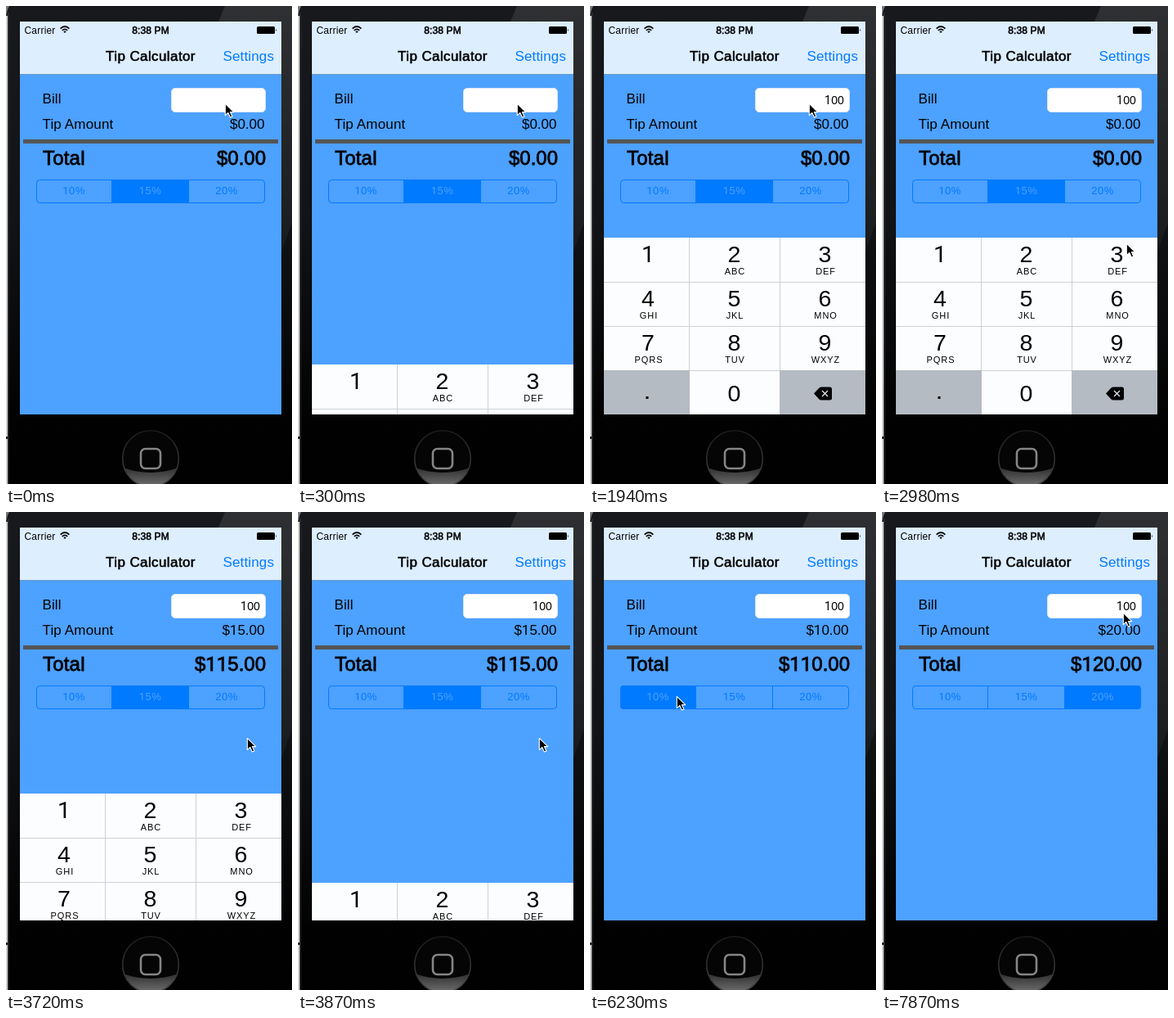
An HTML page for the animation above (8 s loop, 350 by 584 pixels).

```html
<!DOCTYPE html>
<html lang="en">
<head>
<meta charset="utf-8">
<title>Tip Calculator</title>
<style>
html, body { margin: 0; width: 100%; height: 100%; overflow: hidden; background: #000; }
svg { display: block; width: 350px; height: 584px; }
text { font-family: "Liberation Sans", Arial, sans-serif; white-space: pre; }
.one { font-family: Roboto, sans-serif; }
.medium { stroke: #000; stroke-width: .55px; }
.heavy { stroke: #000; stroke-width: .8px; }
</style>
</head>
<body>
<svg viewBox="0 0 350 584" xmlns="http://www.w3.org/2000/svg">
  <defs>
    <linearGradient id="body" x2="0" y2="1">
      <stop offset="0" stop-color="#18191c"/>
      <stop offset=".45" stop-color="#121316"/>
      <stop offset=".86" stop-color="#020202"/>
      <stop offset="1" stop-color="#000"/>
    </linearGradient>
    <linearGradient id="gloss" x2="0" y2="1">
      <stop offset="0" stop-color="#fff" stop-opacity=".1"/>
      <stop offset="1" stop-color="#fff" stop-opacity=".04"/>
    </linearGradient>
    <linearGradient id="shine" x2="0" y2="1">
      <stop offset="0" stop-color="#2c2c2c"/>
      <stop offset="1" stop-color="#777"/>
    </linearGradient>
    <linearGradient id="ring" x2="0" y2="1">
      <stop offset="0" stop-color="#1c1c1c"/>
      <stop offset="1" stop-color="#484848"/>
    </linearGradient>
    <clipPath id="screen"><rect x="17" y="19" width="320" height="480"/></clipPath>
    <clipPath id="home"><circle cx="177" cy="553" r="34"/></clipPath>
    <clipPath id="pill"><rect x="37" y="212" width="280" height="29" rx="4"/></clipPath>
  </defs>

  <rect width="350" height="584" fill="url(#body)"/>
  <path d="M268 0H350V265L337 300V19H260Z" fill="url(#gloss)"/>
  <path d="M0 14Q1 5 4 0H0Z" fill="#77797c"/>
  <rect y="12" width="2" height="572" fill="#cfd0d2"/>
  <rect x="2" y="8" width="1.5" height="576" fill="#2d2e31"/>
  <rect y="526" width="2" height="3" fill="#222"/>

  <g clip-path="url(#home)">
    <circle cx="177" cy="553" r="34" fill="#050505"/>
    <path d="M140 563Q177 577 214 563V590H140Z" fill="url(#shine)"/>
  </g>
  <circle cx="177" cy="553" r="34.3" fill="none" stroke="url(#ring)" stroke-width="1.5"/>
  <rect x="165" y="541" width="24" height="24" rx="5.5" fill="none" stroke="#858585" stroke-width="2.6"/>

  <g clip-path="url(#screen)">
    <rect x="17" y="19" width="320" height="480" fill="#4da1ff"/>
    <rect x="17" y="19" width="320" height="64" fill="#ddeeff"/>
    <rect x="17" y="83" width="320" height="1" fill="#6d9ac9"/>
    <path d="M66.6 27.6Q72 22.4 77.4 27.6M68.8 29.8Q72 26.8 75.2 29.8" fill="none" stroke="#000" stroke-width="1.7"/>
    <path d="M70.3 31.2Q72 29.8 73.7 31.2L72 33Z"/>
    <rect x="307" y="25" width="22" height="9" rx="1.5"/>
    <path d="M330 27.7Q331.6 29.5 330 31.3Z"/>
    <rect x="202.5" y="100.5" width="115" height="29" rx="4.5" fill="#fff" stroke="#d8e6f5"/>
    <rect x="21" y="163" width="312" height="5" fill="#555"/>
    <g id="labels"></g>
    <g clip-path="url(#pill)" fill="#007aff">
      <rect id="press" y="212" width="93.5" height="29" opacity=".2"/>
      <rect id="picked" y="212" width="93.5" height="29"/>
    </g>
    <path d="M129.5 212V241M223.5 212V241" stroke="#007aff"/>
    <rect x="37.5" y="212.5" width="279" height="28" rx="4" fill="none" stroke="#007aff"/>
    <g id="rates"></g>
    <rect id="caret" x="309" y="105" width="2" height="18" fill="#4269dc"/>
    <g id="keys">
      <rect x="17" y="283" width="320" height="216" fill="#fcfdff"/>
      <path d="M121.5 283V499M232.5 283V499M17 337.5H337M17 391.5H337M17 445.5H337" stroke="#cdd1d6"/>
      <path d="M17 445H122V499H17ZM232 445H337V499H232Z" fill="#b5bbc2"/>
      <path d="M274 473.5L280 467Q281.2 465.5 283 465.5H293.5Q296 465.5 296 468V479Q296 481.5 293.5 481.5H283Q281.2 481.5 280 480Z"/>
      <path d="M284 470L291 477M291 470L284 477" stroke="#dfe2e6" stroke-width="1.4"/>
      <rect x="68.5" y="477" width="3" height="3"/>
    </g>
  </g>
  <path id="cursor" d="M1.3 1.3V15.6L4.8 12.4L7.4 18L9.9 17L7.4 11.6H11.8Z" stroke="#fff" stroke-width="1.1" stroke-linejoin="round"/>
</svg>
<script>
const LOOP = 8000;
const BEAT = 148.5; // the screen refreshes once per beat; all timing below is in beats
const BLUE = "#007aff";
const $ = id => document.getElementById(id);

// The plain "1" comes from a face without a foot serif.
function write(node, str) {
  if (node.dataset.str === str) return;
  node.dataset.str = str;
  node.innerHTML = str.replace(/1/g, '<tspan class="one">1</tspan>');
}

function label(parent, str, x, y, size, { anchor = "start", fill = "#000", gap = 0, cls = "" } = {}) {
  const node = document.createElementNS("http://www.w3.org/2000/svg", "text");
  const attrs = { x, y, fill, "font-size": size, "text-anchor": anchor, "letter-spacing": gap, class: cls };
  for (const name in attrs) node.setAttribute(name, attrs[name]);
  write(node, str);
  $(parent).append(node);
  return node;
}

const middle = { anchor: "middle" };
const end = { anchor: "end" };
label("labels", "Carrier", 22.5, 33.5, 12, { gap: .2 });
label("labels", "8:38 PM", 177, 33.5, 12, { ...middle, gap: .15, cls: "medium" });
label("labels", "Tip Calculator", 177, 67, 17, { ...middle, gap: .4, cls: "medium" });
label("labels", "Settings", 265.5, 67, 17, { fill: BLUE, gap: .15 });
label("labels", "Bill", 44.5, 119, 17, { gap: .1 });
label("labels", "Tip Amount", 44.5, 150, 17, { gap: .15 });
label("labels", "Total", 45, 194, 24, { gap: .2, cls: "heavy" });
const bill = label("labels", "", 311, 119.5, 14, { ...end, gap: .15 });
const tip = label("labels", "", 316.5, 150, 17, end);
const total = label("labels", "", 318, 194, 24, { ...end, cls: "heavy" });

const percent = i => 10 + 5 * i;
const segmentX = i => 36 + 93.5 * i;
const rates = [0, 1, 2].map(i =>
  label("rates", percent(i) + "%", segmentX(i) + 47, 230.3, 13, { ...middle, gap: .5 }));

const columns = [71, 176.5, 287.5];
[..." ABC DEF GHI JKL MNO PQRS TUV WXYZ".split(" ")].forEach((word, i) => {
  const x = columns[i % 3], y = 313 + 54 * Math.floor(i / 3);
  label("keys", String(i + 1), x, y, 28.5, middle);
  label("keys", word, x + 1, y + 15, 11, { ...middle, gap: .9 });
});
label("keys", "0", columns[1], 482.5, 28.5, middle);

const ramp = (k, start, length) => Math.min(1, Math.max(0, (k - start) / length));
const smooth = u => u * u * (3 - 2 * u);

// The pointer rests at each stop until it leaves for the next one.
const stops = [
  { x: 267, y: 118, leave: 15 },
  { x: 298, y: 289, arrive: 20, leave: 20 },
  { x: 294, y: 275, arrive: 23, leave: 28 },
  { x: 281, y: 248, arrive: 32, leave: 32 },
  { x: 97, y: 224, arrive: 34, leave: 41 },
  { x: 105, y: 224, arrive: 42, leave: 42 },
  { x: 271, y: 231, arrive: 45, leave: 49 },
  { x: 294, y: 122, arrive: 53 }
];

function pointer(k) {
  let { x, y, leave } = stops[0];
  for (const stop of stops.slice(1)) {
    const u = ramp(k, leave, stop.arrive - leave) ** 2;
    x += (stop.x - x) * u;
    y += (stop.y - y) * u;
    leave = stop.leave;
  }
  return [Math.round(x), Math.round(y)];
}

const SLIDE = 2.85;
const keysDrop = k => Math.round(216 * (1 - smooth(ramp(k, 1, SLIDE)) + smooth(ramp(k, 24, SLIDE))));
const caretOn = k => k >= 4 && k < 25 && (k < 12 || (k - 12) % 7 > 2);
const typed = k => "100".slice(0, [6, 7, 9].filter(press => k >= press).length);
const pickedAt = k => k >= 48 ? 2 : k >= 36 ? 0 : 1;

function draw(t) {
  const k = Math.floor((t + 15) / BEAT);
  $("cursor").setAttribute("transform", `translate(${pointer(k)})`);
  $("keys").setAttribute("transform", `translate(0 ${keysDrop(k)})`);
  $("caret").setAttribute("opacity", +caretOn(k));
  write(bill, typed(k));

  const picked = pickedAt(k);
  const amount = k >= 25 ? 100 : 0;
  const extra = amount * percent(picked) / 100;
  write(tip, "$" + extra.toFixed(2));
  write(total, "$" + (amount + extra).toFixed(2));
  $("picked").setAttribute("x", segmentX(picked));
  $("press").setAttribute("x", segmentX(pickedAt(k + 1)));
  rates.forEach((rate, i) => rate.setAttribute("fill", i === picked ? "#4da1ff" : BLUE));
}

const begin = performance.now();
function tick() {
  draw((performance.now() - begin) % LOOP);
  requestAnimationFrame(tick);
}
tick();
</script>
</body>
</html>
```
